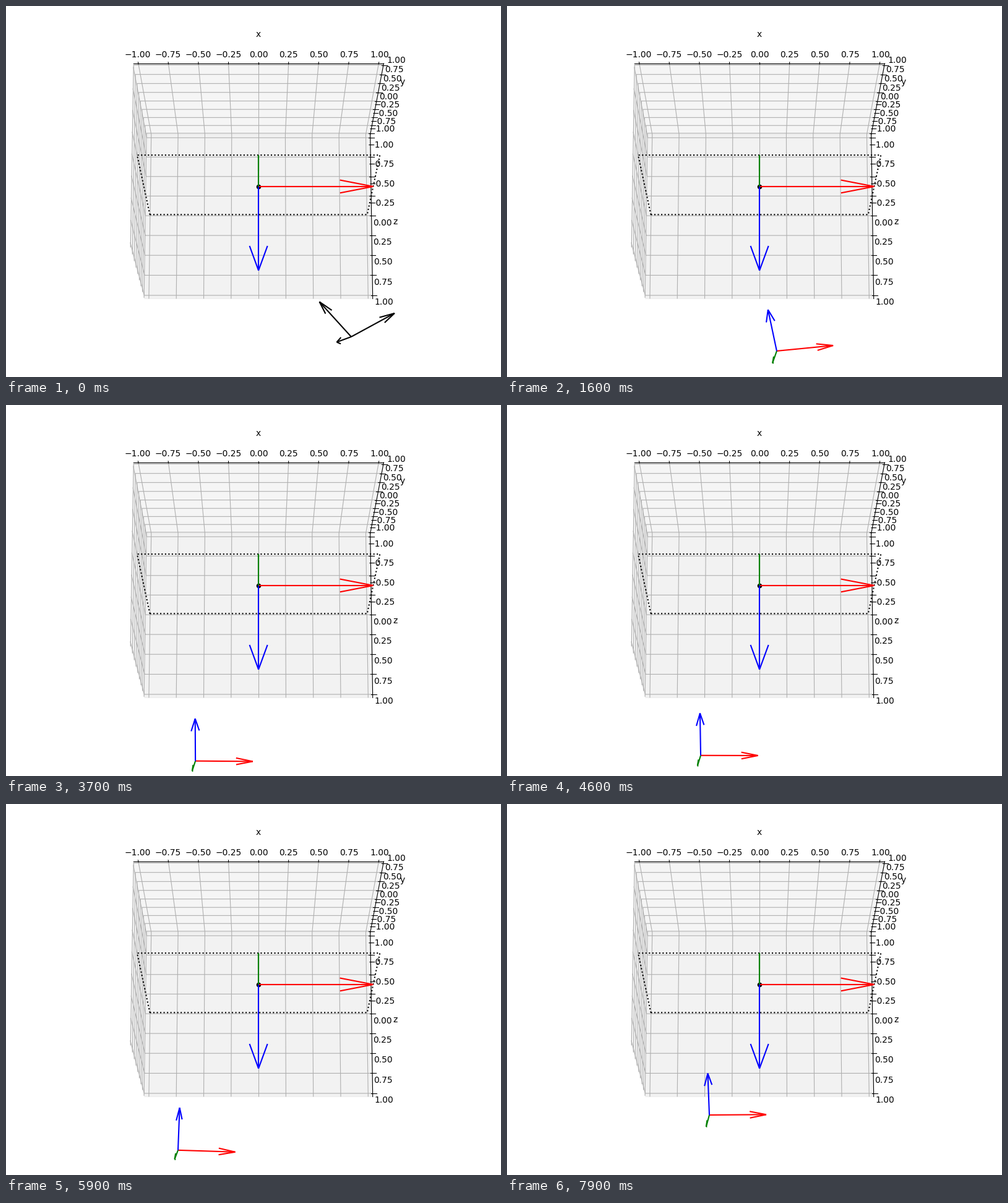
A matplotlib script for the animation above (8 s loop, 800 by 600 pixels).

```python
import numpy as np
import matplotlib.pyplot as plt
from matplotlib.animation import FuncAnimation

FRAMES, INTERVAL = 80, 100
LIM = 25 / 24
FLIP = np.diag([1, -1, -1])

# turning points of the camera's sway: time (s), x, z
SWAY = [(0, 0.83, 1.573), (0.6, -0.525, 1.78), (1.6, 0.15, 1.854),
        (2.1, -0.58, 1.82), (2.8, 0.495, 1.854), (3.6, -0.55, 1.985),
        (4.6, -0.512, 1.918), (5.9, -0.701, 1.868), (7.1, -0.86, 1.541),
        (7.9, -0.439, 1.452)]


def sway(t):
    """Ease in and out between the turning points."""
    for (t0, *p0), (t1, *p1) in zip(SWAY, SWAY[1:]):
        if t <= t1:
            break
    u = (t - t0) / (t1 - t0)
    return np.array(p0) + (np.array(p1) - p0) * u * u * (3 - 2 * u)


def rotation(vec):
    """Rodrigues formula."""
    angle = np.linalg.norm(vec)
    x, y, z = vec / angle
    k = np.array([[0, -z, y], [z, 0, -x], [-y, x, 0]])
    return np.eye(3) + np.sin(angle) * k + (1 - np.cos(angle)) * k @ k


def camera_pose(t):
    """The camera turns towards the marker as it moves sideways."""
    x, z = sway(t)
    start = max(0, 1 - t / 0.5) ** 2  # initial offset that settles
    turn = np.array([0.15 * x**2 - 0.05, 0.12 + 0.2 * x, -0.07 - 0.06 * x**2])
    turn += start * np.array([0.127, 0.349, -0.069])
    return (x, -0.35 - 0.45 * start, z), rotation(turn) @ FLIP


def draw_triad(origin, basis, length, colors):
    return [ax.quiver(*origin, *axis, length=length, color=c)
            for axis, c in zip(basis.T, colors)]


fig = plt.figure(figsize=(8, 6), dpi=100)
fig.subplots_adjust(left=0, bottom=0, right=1, top=1)
ax = fig.add_subplot(projection="3d")
ax.set(xlim=(-LIM, LIM), ylim=(-LIM, LIM), zlim=(-LIM, LIM),
       xlabel="x", ylabel="y", zlabel="z")
# tiny azimuth offset keeps the side wall on the left
ax.view_init(elev=15, azim=90 - 1e-7, roll=180)

ax.plot([-1, 1, 1, -1, -1], [-1, -1, 1, 1, -1], [0] * 5, "k:")
ax.scatter(0, 0, 0, c="k")
draw_triad((0, 0, 0), np.eye(3), 1, "rgb")
moving = []


def update(n):
    while moving:
        moving.pop().remove()
    origin, basis = camera_pose(n * INTERVAL / 1000)
    moving.extend(draw_triad(origin, basis, 0.5, "rgb" if n else "kkk"))
    return moving


anim = FuncAnimation(fig, update, frames=FRAMES, interval=INTERVAL,
                     init_func=lambda: update(0), repeat=True)
plt.show()
```
